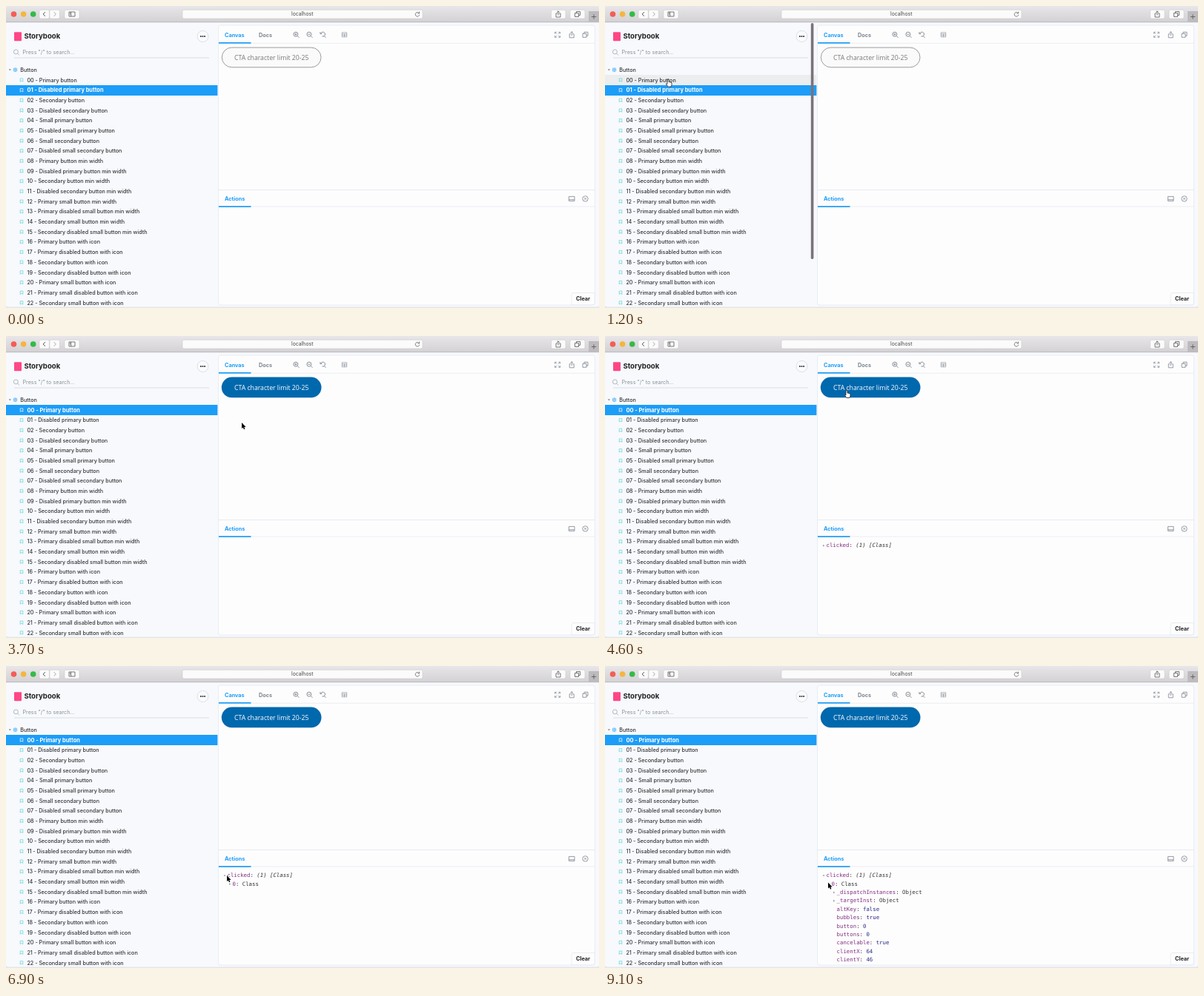
An HTML page with a canvas for the animation above (9200 ms loop, 800x408 px).

```html
<!DOCTYPE html>
<html lang="en">
<head>
<meta charset="utf-8">
<title>Component explorer</title>
<style>
html, body { margin: 0; width: 100%; height: 100%; overflow: hidden; background: #fff; }
canvas { display: block; width: 800px; height: 408px; }
</style>
</head>
<body>
<canvas id="stage"></canvas>
<script>
const W = 800, H = 408, LOOP = 9200, STEP = 100;
const SANS = 'Inter, "Open Sans", sans-serif';
const BODY = '"Open Sans", "Noto Sans", sans-serif';
const MONO = '"DejaVu Sans Mono", "Noto Sans Mono", monospace';
const BLUE = '#1c9df8', INK = '#333', GREY = '#7c858d', LINE = '#e1e6eb';
const SIDE = '#f7f9fd', PANE = '#fdfdfe';

// Moments of the hard changes, in ms
const AT = { hover: 1100, select: 1600, log: 4600, openLog: 6600, openItem: 8700 };

const STORIES = [
  'Primary button', 'Disabled primary button', 'Secondary button',
  'Disabled secondary button', 'Small primary button',
  'Disabled small primary button', 'Small secondary button',
  'Disabled small secondary button', 'Primary button min width',
  'Disabled primary button min width', 'Secondary button min width',
  'Disabled secondary button min width', 'Primary small button min width',
  'Primary disabled small button min width', 'Secondary small button min width',
  'Secondary disabled small button min width', 'Primary button with icon',
  'Primary disabled button with icon', 'Secondary button with icon',
  'Secondary disabled button with icon', 'Primary small button with icon',
  'Primary small disabled button with icon', 'Secondary small button with icon'
];

const PROPS = [
  ['_dispatchInstances', 'Object'], ['_targetInst', 'Object'],
  ['altKey', 'false'], ['bubbles', 'true'], ['button', '0'], ['buttons', '0'],
  ['cancelable', 'true'], ['clientX', '64'], ['clientY', '46']
];

// Pointer stops: time, x, y
const PATH = [
  [300, 744, 38], [1100, 85, 99.5], [2400, 85, 99.5], [3500, 318, 117],
  [3800, 318, 117], [4300, 326, 74], [4800, 326, 74], [5600, 298, 283],
  [7000, 298, 283], [7700, 301, 292.5], [LOOP, 301, 292.5]
];

const canvas = document.getElementById('stage');
const ctx = canvas.getContext('2d');
const dpr = window.devicePixelRatio || 1;
canvas.width = W * dpr;
canvas.height = H * dpr;

function text(str, x, cy, size, color = INK, weight = 400, family = SANS) {
  ctx.font = `${weight} ${size}px ${family}`;
  ctx.fillStyle = color;
  ctx.fillText(str, x, cy + size * 0.36);
  return x + ctx.measureText(str).width;
}

function rect(x, y, w, h, color) {
  ctx.fillStyle = color;
  ctx.fillRect(x, y, w, h);
}

function box(x, y, w, h, r, fill, stroke, width = 1) {
  ctx.beginPath();
  ctx.roundRect(x, y, w, h, r);
  paint(fill, stroke, width);
}

function circle(x, y, r, fill, stroke, width = 1) {
  ctx.beginPath();
  ctx.arc(x, y, r, 0, Math.PI * 2);
  paint(fill, stroke, width);
}

function paint(fill, stroke, width) {
  if (fill) { ctx.fillStyle = fill; ctx.fill(); }
  if (stroke) { ctx.strokeStyle = stroke; ctx.lineWidth = width; ctx.stroke(); }
}

function path(d, x, y, stroke, width = 0.8, fill = null) {
  const p = new Path2D(d);
  ctx.save();
  ctx.translate(x, y);
  if (fill) { ctx.fillStyle = fill; ctx.fill(p); }
  if (stroke) {
    ctx.strokeStyle = stroke;
    ctx.lineWidth = width;
    ctx.lineJoin = 'round';
    ctx.stroke(p);
  }
  ctx.restore();
}

function lens(x, y, color, sign = '') {
  circle(x - 0.6, y - 0.6, 3, null, color, 0.9);
  path('M1.6 1.6L4 4' + sign, x, y, color, 0.9);
}

function share(x, y, color) {
  path('M-1.3 -1H-3V4H3V-1H1.3M0 1.5V-4M-1.8 -2.4L0 -4.2L1.8 -2.4', x, y, color);
}

function pages(x, y, color) {
  path('M-3.5 -1.5H1.5V3.5H-3.5ZM-1.5 -1.5V-3.5H3.5V1.5H1.5', x, y, color);
}

function drawToolbar() {
  const g = ctx.createLinearGradient(0, 0, 0, 22);
  g.addColorStop(0, '#e8e6e8');
  g.addColorStop(1, '#d3d1d3');
  rect(0, 0, W, 22, g);
  rect(0, 21.4, W, 0.8, '#b4b2b4');
  ['#f25e57', '#f4b63f', '#33bb46'].forEach((c, i) => circle(10.5 + i * 13.1, 11, 3.8, c));

  const button = (x, w) => box(x, 5.2, w, 11.8, 2, '#fbfbfb', '#c6c4c6', 0.5);
  button(45, 13.4);
  button(59, 13.4);
  path('M1.3 -2.8L-1.3 0L1.3 2.8', 51.5, 11, '#555', 1);
  path('M-1.3 -2.8L1.3 0L-1.3 2.8', 66, 11, '#aaa', 1);
  button(79, 20);
  path('M-4 -3H4V3H-4ZM-1.3 -3V3M-3 -1.3H-2M-3 0H-2', 89, 11, '#555', 0.8);

  button(238, 324);
  text('localhost', 385, 11, 6.9, '#444');
  path('M2.4 -1.4A2.8 2.8 0 1 0 2.8 .6M2.7 -3.6V-1.2H.4', 555, 11.2, '#666', 0.8);

  button(735.5, 19.5);
  share(745, 11, '#555');
  button(761, 20);
  pages(771, 11, '#555');
  rect(786, 7, 14, 15, '#bdbbbd');
  path('M-3.2 0H3.2M0 -3.2V3.2', 793, 14.5, '#555', 0.8);
}

function drawSidebar(t) {
  box(11, 35.2, 10, 12, 1, '#ff4785');
  text('Storybook', 24.4, 41, 9.6, '#222', 700);
  circle(265.5, 41, 7.5, '#fafcfe', '#d3d9df', 0.8);
  for (let i = -1; i < 2; i++) circle(265.5 + i * 2.6, 41, 0.95, '#222');
  lens(14, 62.5, '#a9b1b8');
  text('Press "/" to search...', 22.5, 62.8, 7.2, '#8b9298');
  rect(11, 69.6, 263, 0.8, '#d0d6db');

  path('M-1.7 -.9H1.7L0 1.2Z', 5.3, 86.2, null, 0, '#8b949b');
  box(10.4, 84, 4.2, 4.4, 1, '#dff2ff', BLUE, 0.6);
  path('M-2.1 0H2.1M0 -2.2V2.2', 12.5, 86.2, BLUE, 0.5);
  text('Button', 19.3, 86.2, 7.2, INK, 500);

  const chosen = t < AT.select ? 1 : 0;
  STORIES.forEach((name, i) => {
    const y = 100.1 + i * 13.675, on = i === chosen;
    const hovered = i === 0 && t >= AT.hover;
    if (on || hovered) rect(0, Math.round(y - 7), 285.4, 14, on ? BLUE : '#ecedef');
    path('M-1.8 -2.2H1.8V2.2L0 .9L-1.8 2.2Z', 21, y, on ? '#fff' : '#5fd3d0', 0.7);
    const label = String(i).padStart(2, '0') + ' - ' + name;
    text(label, 28.4, y, on ? 7.48 : 7.2, on ? '#fff' : INK, on ? 700 : 500);
  });

  // Overlay scrollbar fades after the pointer arrives
  const alpha = t < 900 ? 0 : Math.max(0, Math.min(1, (1900 - t) / 300));
  if (alpha) {
    ctx.globalAlpha = alpha;
    box(277.8, 23, 3.6, 319, 1.8, '#79737a');
    ctx.globalAlpha = 1;
  }
}

function drawTab(label, x, y, active) {
  text(label, x, y, 7.3, active ? BLUE : GREY, 700);
}

function drawCanvasPane(t) {
  box(286.5, 26, 508, 378, 3, PANE, LINE, 0.7);
  rect(287, 49.8, 507, 0.7, LINE);
  drawTab('Canvas', 295, 39.2, true);
  drawTab('Docs', 341, 39.2, false);
  rect(287, 49, 43.5, 1.7, BLUE);

  lens(391.5, 38.8, GREY, 'M-2.2 -.6H1M-.6 -2.2V1');
  lens(409.5, 38.8, GREY, 'M-2.2 -.6H1');
  path('M-2.8 -1.6A3 3 0 1 1 -1 2.2M-3.6 -3.6V-1.2H-1.2M1.5 1.5L4 4', 427.5, 38.8, GREY, 0.9);
  path('M-3.2 -3H3.2V3H-3.2ZM-3.2 -1H3.2M-3.2 1H3.2M0 -1V3', 456.5, 38.8, GREY, 0.6);
  path('M-3.5 -1.2V-3.5H-1.2M1.2 -3.5H3.5V-1.2M3.5 1.2V3.5H1.2M-1.2 3.5H-3.5V1.2' +
    'M-3.5 -3.5L-1 -1M3.5 -3.5L1 -1M3.5 3.5L1 1M-3.5 3.5L-1 1', 744, 38.8, GREY, 0.7);
  share(763.2, 38.8, GREY);
  pages(781.5, 38.8, GREY);

  if (t < AT.select) {
    box(291.3, 56.1, 133.7, 26.7, 13.35, '#fafafa', '#858585', 0.8);
  } else {
    box(290.8, 55.6, 134.7, 27.7, 13.85, '#0068ad');
  }
  text('CTA character limit 20-25', 308, 69.4, 8.7, t < AT.select ? '#777' : '#fff', 400, BODY);
}

function logLine(x, y, key, value, color, italic) {
  const end = text(key, x, y, 7.35, '#83307f', 400, MONO);
  text(': ', end, y, 7.35, INK, 400, MONO);
  text(value, end + 8.85, y, 7.35, color, italic ? 'italic 400' : 400, MONO);
}

function twisty(x, y, open) {
  path(open ? 'M-1.4 -.8H1.4L0 1.1Z' : 'M-.8 -1.4L1.1 0L-.8 1.4Z', x, y, null, 0, '#888');
}

function drawActions(t) {
  rect(286.5, 248, 508, 0.8, LINE);
  rect(287, 270.6, 507, 0.7, LINE);
  drawTab('Actions', 295, 260.6, true);
  rect(287, 270.1, 43.5, 1.7, BLUE);
  path('M-3.8 -3H3.8V3H-3.8ZM-3.8 1.3H3.8', 763.2, 260.4, GREY, 0.8);
  circle(781.5, 260.4, 3.7, null, GREY, 0.8);
  path('M-1.4 -1.4L1.4 1.4M1.4 -1.4L-1.4 1.4', 781.5, 260.4, GREY, 0.8);

  const top = 282.8, row = 11.35;
  ctx.save();
  ctx.beginPath();
  ctx.rect(287, 272, 507, 131.5);
  ctx.clip();
  if (t >= AT.log) {
    twisty(295, top + 0.4, t >= AT.openLog);
    logLine(298.5, top, 'clicked', '(1) [Class]', INK, true);
  }
  if (t >= AT.openLog) {
    twisty(302, top + row + 0.4, t >= AT.openItem);
    logLine(305.5, top + row, '0', 'Class', INK);
  }
  if (t >= AT.openItem) {
    PROPS.forEach(([key, value], i) => {
      const y = top + row * (i + 2), nested = value === 'Object';
      if (nested) twisty(309, y + 0.4, false);
      logLine(312.6, y, key, value, nested ? INK : '#2a2a86');
    });
  }
  ctx.restore();

  box(763, 387.5, 31.3, 16.3, [3, 0, 3, 0], PANE, LINE, 0.7);
  text('Clear', 769, 395, 7.3, '#222', 700);
}

function pointerAt(t) {
  const i = PATH.findIndex(p => p[0] > t);
  const [t0, x0, y0] = PATH[i - 1], [t1, x1, y1] = PATH[i];
  const u = (t - t0) / (t1 - t0), e = u * u * (3 - 2 * u);
  return [x0 + (x1 - x0) * e, y0 + (y1 - y0) * e];
}

function drawPointer(t) {
  if (t < PATH[0][0]) return;
  const [x, y] = pointerAt(t);
  const onStory = t >= AT.hover && t < AT.select;
  const onButton = t >= 3900 && x > 291 && x < 425 && y > 56 && y < 83;
  if (onStory || onButton) {
    path('M-1 4.5V0Q0 -1.3 1 0V3L2.2 3.2L3.6 3.6L5 4.4V7L4 9.5H0L-2.6 6Q-2.6 4.6 -1 6Z',
      x, y, '#222', 0.8, '#fff');
  } else {
    const arrow = 'M0 0V8L1.8 6.4L3 9.2L4.4 8.6L3.2 5.9H5.6Z';
    path(arrow, x, y, '#fff', 1.3);
    path(arrow, x, y, null, 0, '#000');
  }
}

function draw(t) {
  ctx.setTransform(dpr, 0, 0, dpr, 0, 0);
  rect(0, 0, W, H, '#e4e5e7');
  ctx.save();
  ctx.beginPath();
  ctx.roundRect(0, 0, W, 406.5, 3);
  ctx.clip();
  rect(0, 0, W, H, SIDE);
  drawSidebar(t);
  drawCanvasPane(t);
  drawActions(t);
  drawToolbar();
  ctx.restore();
  drawPointer(t);
}

function tick() {
  const t = performance.now() % LOOP;
  draw(Math.floor(t / STEP) * STEP);
  requestAnimationFrame(tick);
}
tick();
</script>
</body>
</html>
```
